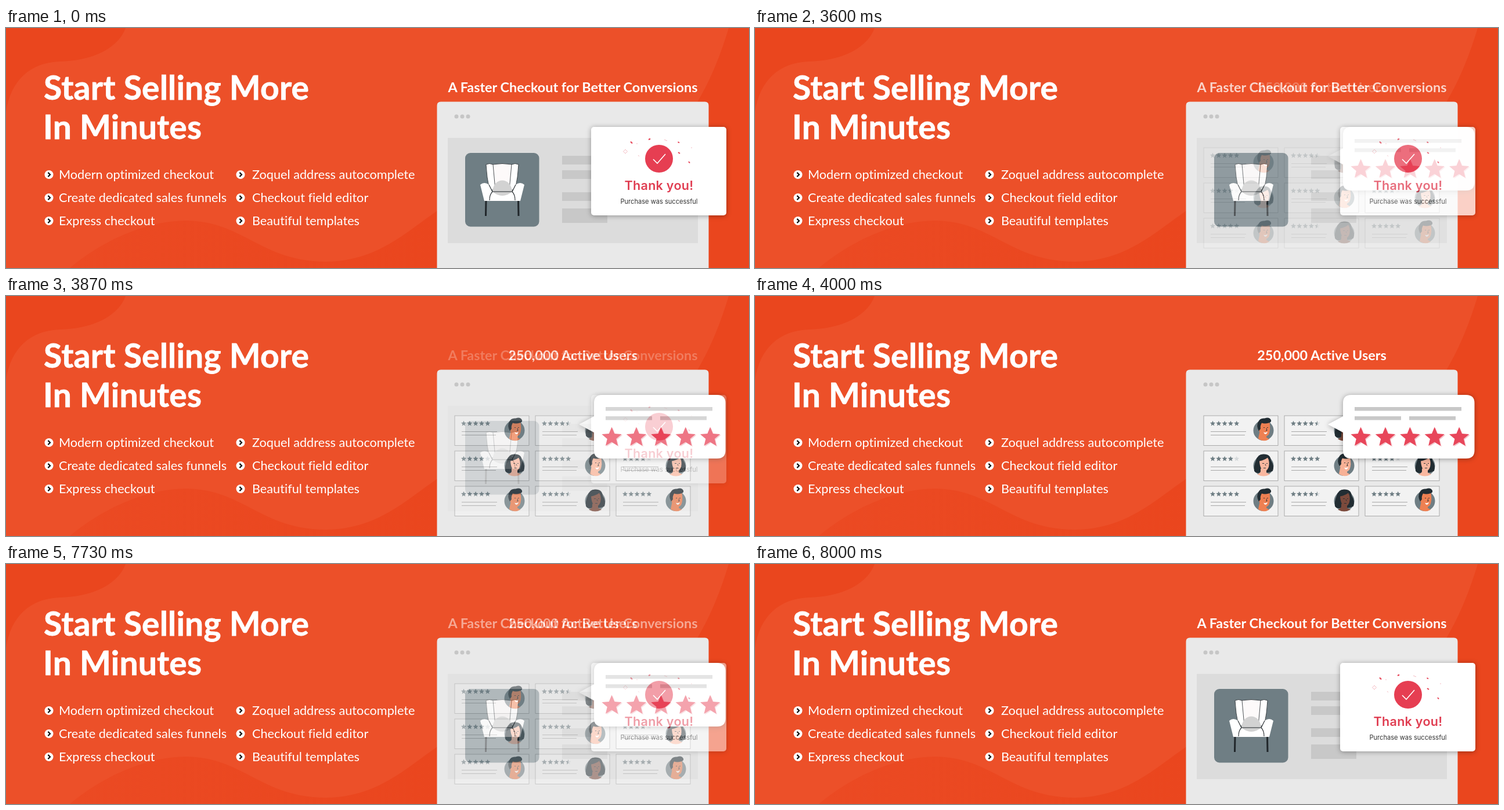
Recreate the animation shown at these times as an HTML page. Size 1280x415 px, loop 8070 ms.

```html
<!DOCTYPE html>
<html lang="en">
<head>
<meta charset="utf-8">
<title>Checkout banner</title>
<style>
  html, body { margin: 0; height: 100%; overflow: hidden; background: #ec5029; }
  svg { display: block; width: 100vw; height: 100vh; font-family: Lato, "Open Sans", sans-serif; font-variant-ligatures: none; }
  .heading { font-size: 57px; font-weight: 700; letter-spacing: .2px; stroke: #fff; stroke-width: .8px; }
  .item { font-size: 21.7px; }
  .title { font-size: 23.4px; font-weight: 700; }
  .mid { text-anchor: middle; }
  .card { font-family: Inter, "Open Sans", sans-serif; }
  .shadow { filter: drop-shadow(0 1px 4px rgba(0, 0, 0, .35)); }
  #scenes { isolation: isolate; }
  #users { mix-blend-mode: plus-lighter; }
</style>
</head>
<body>
<svg viewBox="0 0 1280 415" fill="#fff">
  <linearGradient id="wave" gradientUnits="userSpaceOnUse" x1="110" x2="743">
    <stop stop-color="#eb4a23"/><stop offset="1" stop-color="#ea461e"/>
  </linearGradient>
  <rect width="1280" height="415" fill="#ec5029"/>
  <path d="M0 0H206C194 34 150 57 92 58C40 60 8 92 0 145Z" fill="#ea461e"/>
  <path d="M110 415C160 372 236 333 312 333C410 335 440 404 552 404C640 403 690 352 743 316C900 240 1120 240 1190 130C1218 82 1232 42 1245 0H1280V415Z" fill="url(#wave)"/>
  <text class="heading" x="65" y="124">Start Selling More</text>
  <text class="heading" x="64" y="191.5">In Minutes</text>
  <g id="list"></g>

  <path d="M742.500 415V134Q742.500 127.500 749 127.500H1204Q1210.500 127.500 1210.500 134V415Z" fill="#e9e9e9"/>
  <g fill="#c6c6c6">
    <circle cx="776" cy="153" r="3.5"/><circle cx="786" cy="153" r="3.5"/><circle cx="796" cy="153" r="3.5"/>
  </g>

  <g id="scenes">
    <g id="checkout">
      <text class="title mid" x="976.5" y="111">A Faster Checkout for Better Conversions</text>
      <path d="M761 190H1192V372H761Z" fill="#dcdcdc"/>
      <path d="M958 221h78v15h-78zM958 246h78v15h-78zM958 284h78v15h-78zM958 312h78v25h-78z" fill="#c8c8c8"/>
      <rect x="791" y="216" width="127.500" height="127.500" rx="9" fill="#6f7e84"/>
      <g stroke="#20262a" stroke-linejoin="round">
        <path d="M827 298L826.500 325M882.500 298L883 325" stroke-width="3"/>
        <path d="M838 236Q855 233 872 236V284H838Z" fill="#fdfafa" stroke-width=".8"/>
        <path d="M827 236Q833 233 839 236L843 280H833Q828 258 827 236ZM883 236Q877 233 871 236L867 280H877Q882 258 883 236Z" fill="#fff" stroke-width=".8"/>
        <path d="M817 271Q824 265 832 271L838 283H872L878 271Q886 265 893 271L886 299H824Z" fill="#fff" stroke="none"/>
        <path d="M838 283C840 257 870 257 872 283Q855 297 838 283Z" fill="#d2d2d2" stroke="none"/>
        <path d="M832 271L838 283H872L878 271M838 283Q833 288 833 298M872 283Q877 288 877 298" fill="none" stroke-width="1.100"/>
      </g>
      <rect class="shadow" x="1008" y="171" width="233" height="153" rx="5"/>
      <circle cx="1125" cy="226" r="24" fill="#e63e52"/>
      <path d="M1115 227L1122 234L1136 218" fill="none" stroke="#fff" stroke-width="1.600"/>
      <g fill="none" stroke="#e63e52" stroke-width="2">
        <path d="M1076 196.500l3 3M1158 215l3 2M1176 231l2 2.500M1157.500 197l2.500 1.500M1107 193l3-1.500"/>
        <path d="M1067 210l3.500 3.500-3.500 3.500-3.500-3.500zM1180 207h2M1134 193l5 2M1089 220l2 2M1086 200h2" stroke="#f4bac1" stroke-width="1"/>
      </g>
      <g class="card mid">
        <text x="1125" y="280" font-size="21.500" font-weight="600" letter-spacing=".3" fill="#e03e52">Thank you!</text>
        <text x="1125" y="304" font-size="11.100" fill="#333">Purchase was successful</text>
      </g>
    </g>

    <g id="users">
      <text class="title mid" x="976.5" y="111">250,000 Active Users</text>
      <g id="reviews"></g>
      <path class="shadow" d="M1027 171H1225Q1239.500 171 1239.500 185V267Q1239.500 281 1225 281H1027Q1013 281 1013 267V236L987 222L1013 208V185Q1013 171 1027 171Z"/>
      <path d="M1033 192h184v6.500h-184zM1033 208h80v6.500h-80zM1127 208h80v6.500h-80z" fill="#c8c8c8"/>
      <g id="rating"></g>
    </g>
  </g>
</svg>
<script>
const $ = id => document.getElementById(id);
const GREY = '#6f7e84', DARK = '#222d33';

function star(x, y, r, fill) {
  let points = '';
  for (let i = 0; i < 10; i++) {
    const a = (i / 5 - .5) * Math.PI, d = i % 2 ? r * .45 : r;
    points += `${(x + d * Math.cos(a)).toFixed(2)},${(y + d * Math.sin(a)).toFixed(2)} `;
  }
  return `<polygon points="${points}" fill="${fill}"/>`;
}

// Bullet list
const items = [
  ['Modern optimized checkout', 'Create dedicated sales funnels', 'Express checkout'],
  ['Zoquel address autocomplete', 'Checkout field editor', 'Beautiful templates']
];
$('list').innerHTML = items.map((column, c) => column.map((label, r) => {
  const x = 74 + c * 330, y = 253.5 + r * 40;
  return `<circle cx="${x}" cy="${y}" r="7.5"/>
    <path d="M${x - 1.6} ${y - 3.6}l3.600 3.600l-3.600 3.600" fill="none" stroke="#111" stroke-width="2.200"/>
    <text class="item" x="${c ? 424 : 91}" y="${y + 7.5}">${label}</text>`;
}).join('')).join('');

// Avatars, centred on their grey disc
const features = `<path d="M0 -5h2M6 -5h2M5 -4l1 4h-2" fill="none" stroke="${DARK}" stroke-width=".9"/>
  <path d="M0 3Q4 5 7 2Q6 7 2 6Z" fill="#fff"/>`;
function man(skin) {
  return `<path d="M-9 14L-6 0H6L5 12L10 15Q0 21 -9 14Z" fill="${skin}"/>
    <path d="M-9 -13L10 -15Q13 -2 9 7Q4 13 -3 8L-8 0Z" fill="${skin}"/>
    <path d="M-8 1Q-13 -8 -9 -15Q-6 -22 2 -21Q10 -24 13 -18Q14 -14 9 -13Q2 -11 -3 -13Q-6 -8 -5 -3Z" fill="${DARK}"/>${features}`;
}
function woman(skin) {
  return `<path d="M-16 9Q-17 0 -13 -9Q-10 -21 1 -20Q12 -20 13 -9Q19 0 16 9Q8 13 -6 12Q-13 14 -16 9Z" fill="${DARK}"/>
    <path d="M-5 5H5V12Q10 14 11 15Q0 21 -11 15Q-6 13 -5 10Z" fill="${skin}"/>
    <path d="M-7 -8Q2 -10 7 -14Q11 -8 9 2Q6 10 1 9Q-6 7 -7 -8Z" fill="${skin}"/>
    <path d="M-2 -4h3M5 -4h2M3 -3l1 3M0 4h4" fill="none" stroke="${DARK}" stroke-width=".9"/>`;
}

const orange = man('#ee8052'), fair = man('#f7b196');
const pale = woman('#f9b79f'), brown = woman('#7c4a3c');
const reviews = [
  [5, orange], [4.5, brown], [5, pale],
  [4, pale], [5, fair], [4, pale],
  [5, orange], [4.5, brown], [5, orange]
];
$('reviews').innerHTML = reviews.map(([score, avatar], n) => {
  const x = 773 + n % 3 * 139, y = 207 + Math.floor(n / 3) * 61;
  let stars = '';
  for (let i = 0; i < 5; i++) {
    const left = score - i, sx = 15.5 + i * 10.3;
    stars += star(sx, 13.5, 4.8, left >= 1 ? GREY : '#d5d9db');
    if (left === .5) stars += `<path d="M${sx} 8.700V15.500L${sx - 2.8} 17.400L${sx - 2} 14.200L${sx - 4.6} 12H${sx - 1.1}Z" fill="${GREY}"/>`;
  }
  return `<g transform="translate(${x} ${y})">
    <rect width="128" height="51.500" fill="#f2f2f2" stroke="#999" stroke-width=".8"/>
    ${stars}
    <path d="M12 27.500H73M12 33.500H71" stroke="#888" stroke-width=".7"/>
    <g transform="translate(103 25.500)"><circle r="17.500" fill="${GREY}"/>${avatar}</g>
  </g>`;
}).join('');

for (let i = 0; i < 5; i++) {
  const x = 1043.5 + i * 42.4;
  $('rating').innerHTML += star(x + 1.5, 246, 18, '#f3c3c9') + star(x, 244.5, 18, '#e8465a');
}

// Cross-fade in eight steps, out and back
const LOOP = 8070;
const fade = (t, start) => Math.max(0, Math.min(8, Math.floor((t - start) / 66.6) + 1)) / 8;
const begin = performance.now();
function draw(now) {
  const t = Math.max(0, now - begin) % LOOP;
  const p = fade(t, 3530) - fade(t, 7530);
  $('checkout').style.opacity = 1 - p;
  $('users').style.opacity = p;
  requestAnimationFrame(draw);
}
draw(begin);
</script>
</body>
</html>
```
